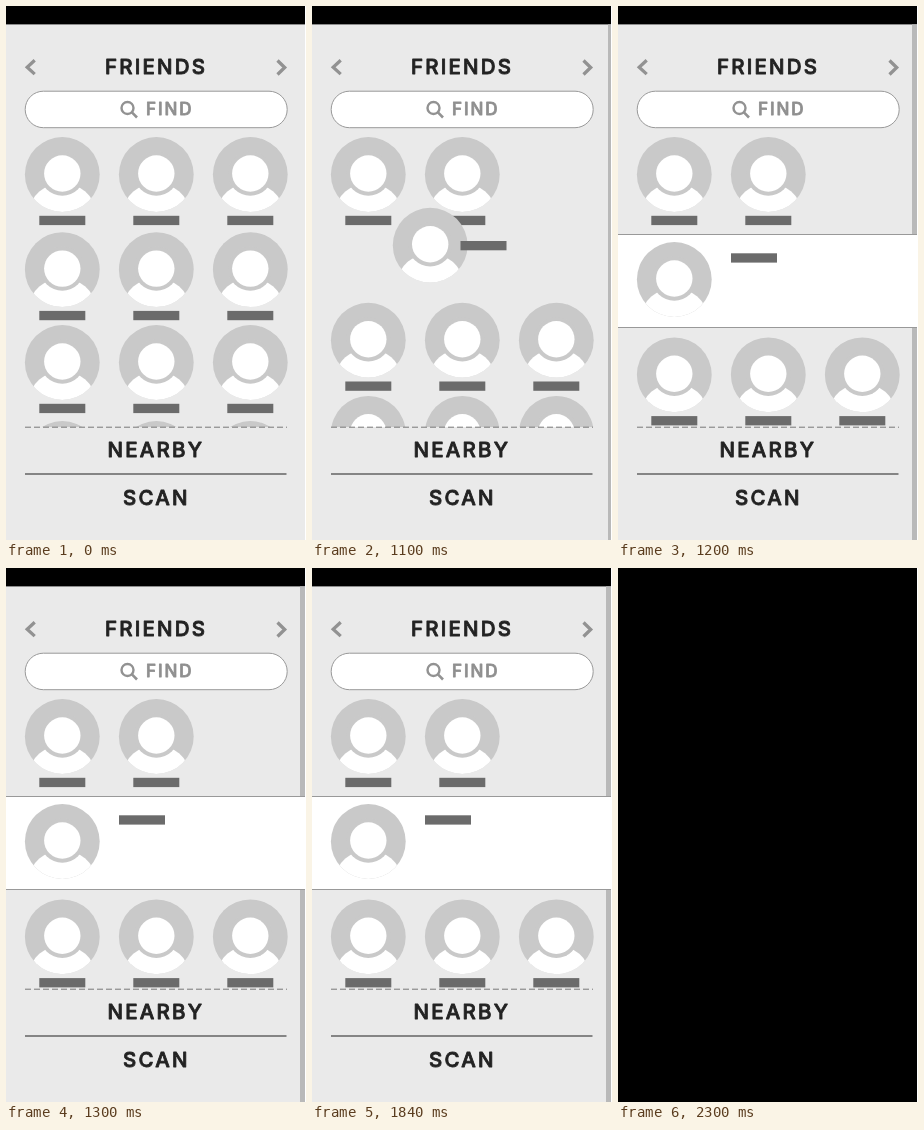
Recreate the animation shown at these times as an HTML page. Size 300 px wide and 534 px high, loop 2.4 s.

```html
<!DOCTYPE html>
<html lang="en">
<head>
<meta charset="utf-8">
<title>Friends list</title>
<style>
  html, body { margin: 0; width: 100%; height: 100%; overflow: hidden; background: #000; }
  svg { display: block; width: 100vw; height: 100vh; }
  text {
    font: 500 20.5px Inter, sans-serif; letter-spacing: 2.2px;
    fill: #222; stroke: #222; stroke-width: .8; stroke-linejoin: round;
  }
  .find { font-size: 17px; letter-spacing: 1.9px; fill: #8f8f8f; stroke: #8f8f8f; }
  .icon { fill: none; stroke: #929292; stroke-width: 3.3; }
</style>
</head>
<body>
<svg viewBox="0 0 300 534" preserveAspectRatio="none">
  <defs>
    <clipPath id="disc"><circle r="37.4"/></clipPath>
    <clipPath id="list"><rect y="123" width="300" height="298"/></clipPath>
    <g id="avatar">
      <circle r="37.4" fill="#c9c9c9"/>
      <ellipse cy="36.8" rx="32.5" ry="28" fill="#fff" clip-path="url(#disc)"/>
      <circle cy="-1" r="22.2" fill="#c9c9c9"/>
      <circle cy="-1" r="18.2" fill="#fff"/>
    </g>
    <rect id="label" width="46" height="9.3" fill="#6b6b6b"/>
  </defs>
  <g id="screen">
    <rect y="18.4" width="300" height="516" fill="#eaeaea"/>
    <rect id="scrollbar" y="18.4" width="6" height="516" fill="#b9b9b9"/>

    <path class="icon" d="M28.7 54.3L21.2 61.2L28.7 68.1M271.5 54.5L278.7 61.5L271.5 68.5"/>
    <text x="99" y="68.3">FRIENDS</text>

    <rect x="19.2" y="85.2" width="262" height="36.5" rx="18.2" fill="#fff" stroke="#999"/>
    <circle class="icon" cx="121.5" cy="102" r="6" style="stroke-width:2.4"/>
    <path class="icon" d="M125.7 106.2L131 111.5" style="stroke-width:2.6"/>
    <text class="find" x="140" y="109.3">FIND</text>

    <g id="people" clip-path="url(#list)"></g>

    <path d="M19 421.2H281" stroke="#777" stroke-dasharray="6 3"/>
    <text x="101.5" y="451.3">NEARBY</text>
    <path d="M19 468H280.5" stroke="#222" stroke-width="1.2"/>
    <text x="117" y="498.5">SCAN</text>
  </g>
  <rect x="299" width="1" height="534" fill="#fff"/>
</svg>
<script>
const LOOP = 2400, PICK = 1100, OPEN = 1200, BLANK = 2300;
const COLUMNS = [56.3, 150.3, 244.3];
const byId = id => document.getElementById(id);
const use = (id, x, y) => `<use href="#${id}" x="${x}" y="${y}"/>`;

const person = (x, y, labelX = x - 23, labelY = y + 41.3) =>
  use('avatar', x, y) + use('label', labelX, labelY);

const row = (y, count = 3) =>
  COLUMNS.slice(0, count).map(x => person(x, y)).join('');

const openPanel =
  '<rect x="-1" y="228.5" width="302" height="93" fill="#fff" stroke="#999"/>' +
  person(56.3, 273.5, 113, 247.3);

const states = {
  grid: { bar: 300, people: row(168.5) + row(263.6) + row(356.5) + row(452.5) },
  picked: {
    bar: 296,
    people: row(168.5, 2) + row(334.2) + row(427.3) + person(118.2, 239.2, 148.5, 235)
  },
  open: { bar: 294, people: row(168.5, 2) + openPanel + row(368.8) }
};

let shown;
function frame(now) {
  const t = now % LOOP;
  const name = t < PICK ? 'grid' : t < OPEN ? 'picked' : 'open';
  byId('screen').style.display = t < BLANK ? '' : 'none';
  if (name !== shown) {
    shown = name;
    byId('people').innerHTML = states[name].people;
    byId('scrollbar').setAttribute('x', states[name].bar);
  }
  requestAnimationFrame(frame);
}
frame(0);
</script>
</body>
</html>
```
